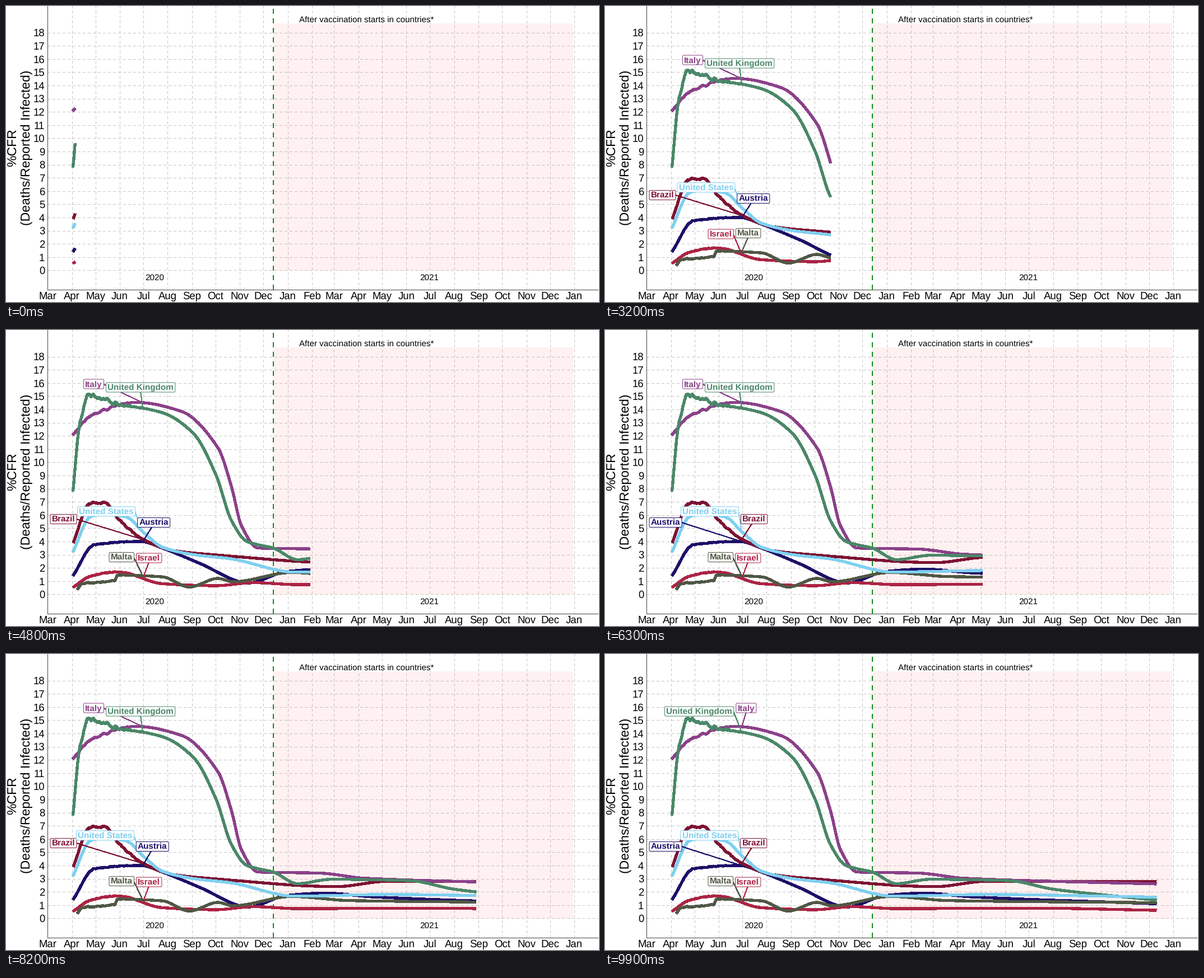
A matplotlib script that plays this animation: 1058 px wide and 529 px high, repeating every 10000 ms.

```python
import numpy as np
import matplotlib.pyplot as plt
from matplotlib.animation import FuncAnimation
from matplotlib.patches import FancyBboxPatch, Rectangle

W, H, DPI = 1058, 529, 128
PX = 72 / DPI
plt.rcParams["font.family"] = "Liberation Sans"
plt.rcParams["text.hinting"] = "none"

FRAMES, STEP_MS = 100, 100
START_X, SPEED, LAST_X = 123.3, 8.727, 984
DAY, APRIL = 1.4008, 117.6
LEFT, RIGHT, BOTTOM = 73.5, 1056, 506.5
ANCHOR_X, LABEL_FROM = 245, 14
BOX_H, GAP = 17, 4

# Per country: colour, early roughness, label top, turning points (x, value)
SERIES = {
    "Austria": ("#1E1068", 0.05, 335.5, [
        (119.5, 1.4), (158, 3.75), (240, 4), (279, 3.5), (345, 2.35),
        (433, 0.86), (500, 1.72), (570, 1.9), (655, 1.62), (984, 1.1)]),
    "Brazil": ("#7D1434", 0.12, 329.5, [
        (120, 3.9), (149, 6.85), (176, 6.95), (203, 5.6), (245, 4.15),
        (300, 3.3), (374, 2.98), (590, 2.4), (680, 2.8), (984, 2.78)]),
    "Israel": ("#AC2445", 0.03, 399, [
        (119.5, 0.52), (150, 1.35), (200, 1.7), (279, 0.8), (375, 0.65),
        (440, 0.88), (520, 0.73), (760, 0.77), (984, 0.6)]),
    "Italy": ("#8B4189", 0.08, 88, [
        (119, 12.05), (150, 13.45), (232, 14.53), (313, 13.85), (378, 11.1),
        (402, 8.2), (420, 5.2), (450, 3.5), (560, 3.42), (640, 3.03), (984, 2.6)]),
    "Malta": ("#4F5845", 0.06, 397.5, [
        (127, 0.35), (135, 0.75), (194, 1.05), (199, 1.45), (279, 1.32),
        (327, 0.55), (378, 1.2), (405, 0.95), (510, 1.65), (612, 1.34), (984, 1.18)]),
    "United Kingdom": ("#4A8768", 0.2, 94, [
        (119.5, 7.8), (131, 12.7), (149, 15.15), (180, 14.6), (279, 13.75),
        (334, 12.2), (375, 9), (402, 5.6), (430, 4), (478, 3.48),
        (520, 2.62), (580, 2.95), (720, 2.85), (800, 2.2), (984, 1.37)]),
    "United States": ("#7FD0F0", 0.03, 315.8, [
        (119.5, 3.2), (150, 5.85), (175, 6.1), (215, 5.85), (245, 4.7),
        (280, 3.55), (335, 3), (402, 2.68), (515, 1.68), (680, 1.8), (984, 1.6)]),
}


def to_y(value):
    return 472.3 - 23.6 * value


def smooth(px, py, x):
    """Monotone cubic through the turning points."""
    h = np.diff(px)
    d = np.diff(py) / h
    a, b = d[:-1], d[1:]
    same = a * b > 0
    inner = np.where(same, 2 * a * b / np.where(same, a + b, 1), 0)
    m = np.concatenate([d[:1], inner, d[-1:]])
    i = np.clip(np.searchsorted(px, x) - 1, 0, len(h) - 1)
    t = (x - px[i]) / h[i]
    return (py[i] * (1 + 2 * t) * (1 - t) ** 2 + m[i] * h[i] * t * (1 - t) ** 2
            + py[i + 1] * t * t * (3 - 2 * t) + m[i + 1] * h[i] * t * t * (t - 1))


def daily_curve(points, rough, rng):
    px, py = np.array(points).T
    x = np.append(np.arange(px[0], LAST_X, DAY), LAST_X)
    noise = np.convolve(rng.uniform(-1.5, 1.5, len(x)), np.ones(3) / 3, "same")
    fade = np.clip((245 - x) / 60, 0, 1) * np.clip((x - 119) / 25, 0, 1)
    return x, to_y(smooth(px, py, x) + rough * fade * noise)


def label_rows(n):
    """Rows of neighbouring labels with their left end; some swap at times."""
    if 8 * n % 11 < 3:
        yield 106.5, ("United Kingdom", "Italy")
    else:
        yield 138.5, ("Italy", "United Kingdom")
    if 5 * n % 9 < 5:
        yield 79, ("Austria",)
        yield 136.8 - 0.02 * n, ("United States", "Brazil")
    else:
        yield 79, ("Brazil",)
        yield 131 - 0.07 * n, ("United States", "Austria")
    yield 184, ("Israel", "Malta") if 11 * n % 13 < 3 else ("Malta", "Israel")


def box_link(left, top, width, ay):
    """Point of the box border where the leader line starts."""
    bottom, right = top + BOX_H, left + width
    midx, midy = left + width / 2, top + BOX_H / 2
    x = min(max(ANCHOR_X, left), right)
    d = np.hypot(ANCHOR_X - x, ay - bottom)
    alt_x = np.hypot(ANCHOR_X - midx, ay - bottom)
    alt_y = np.hypot(ANCHOR_X - x, ay - midy)
    if x == ANCHOR_X or alt_x < alt_y:
        return x + (midx - x) * d / alt_x, bottom
    return x, bottom + (midy - bottom) * d / alt_y


fig = plt.figure(figsize=(W / DPI, H / DPI), dpi=DPI, facecolor="white")
ax = fig.add_axes([0, 0, 1, 1])
ax.set_xlim(0, W)
ax.set_ylim(H, 0)
ax.axis("off")


def line(xs, ys, color, width, z, **kw):
    return ax.plot(xs, ys, color=color, lw=width * PX, zorder=z,
                   antialiased=False, **kw)[0]


def write(x, y, s, size, **kw):
    kw = {"ha": "center", "va": "baseline", "color": "black", "zorder": 8, **kw}
    return ax.text(x, y, s, fontsize=size * PX, **kw)


# Grid, axes and captions
GRID = dict(color="#C6C6C6", width=1, z=1, dashes=(4, 4))
MONTHS = "Jan Feb Mar Apr May Jun Jul Aug Sep Oct Nov Dec".split()
for k in range(2, 25):
    first = (np.datetime64("2020-01") + k).astype("datetime64[D]")
    x = APRIL + DAY * (first - np.datetime64("2020-04-01")).astype(int)
    line([x, x], [BOTTOM, 0], **GRID)
    write(x, 524.3, MONTHS[k % 12], 18.5)
for v in range(19):
    line([LEFT, RIGHT], [to_y(v)] * 2, **GRID)
    write(69.3, to_y(v) + 6.8, str(v), 18.5, ha="right")

ax.add_patch(Rectangle((477, 30.5), 535, 442, fc=(1, 0, 0, 0.055), ec="none", zorder=2))
line([476.5] * 2, [BOTTOM, 0], "#108A18", 2, 3, dashes=(4, 4))
line([LEFT] * 2, [0, BOTTOM], "#444444", 1, 2)
line([LEFT, RIGHT], [BOTTOM] * 2, "#444444", 1, 2)

write(265.5, 490, "2020", 15.2)
write(755.5, 490, "2021", 15.2)
write(643.3, 30.3, "After vaccination starts in countries*", 15.15)
turned = dict(rotation=90, rotation_mode="anchor")
write(18, 253.5, "%CFR", 23, **turned)
write(43, 253.5, "(Deaths/Reported Infected)", 23, **turned)

# Curves and their labels
rng = np.random.default_rng(4)
curves, labels = {}, {}
for name, (color, rough, top, points) in SERIES.items():
    x, y = daily_curve(points, rough, rng)
    art = line([], [], color, 4.3, 5, solid_capstyle="butt", solid_joinstyle="round")
    curves[name] = (x, y, art)

    text = write(0, top + 13.8, name, 15.3, color=color, weight="bold")
    width = text.get_window_extent().width + 5.5
    box = FancyBboxPatch((0, top), width, BOX_H, boxstyle="round,pad=0,rounding_size=2",
                         fc="white", ec=color, lw=PX, zorder=7)
    ax.add_patch(box)
    leader = line([], [], color, 1, 6)
    labels[name] = (box, text, leader, width, top, np.interp(ANCHOR_X, x, y))


def place_label(name, left):
    box, text, leader, width, top, ay = labels[name]
    box.set_x(left)
    text.set_x(left + width / 2)
    lx, ly = box_link(left, top, width, ay)
    leader.set_data([lx, ANCHOR_X - 1], [ly, ay])
    return left + width + GAP


def update(n):
    end = min(START_X + SPEED * n, LAST_X)
    for x, y, art in curves.values():
        seen = x < end
        if seen.any():
            art.set_data(np.append(x[seen], end), np.append(y[seen], np.interp(end, x, y)))
        else:
            art.set_data([], [])

    for left, names in label_rows(n):
        for name in names:
            left = place_label(name, left)
    for box, text, leader, *_ in labels.values():
        for art in (box, text, leader):
            art.set_visible(n >= LABEL_FROM)
    return []


anim = FuncAnimation(fig, update, frames=FRAMES, interval=STEP_MS,
                     init_func=lambda: update(0), repeat=True, repeat_delay=0)
plt.show()
```
